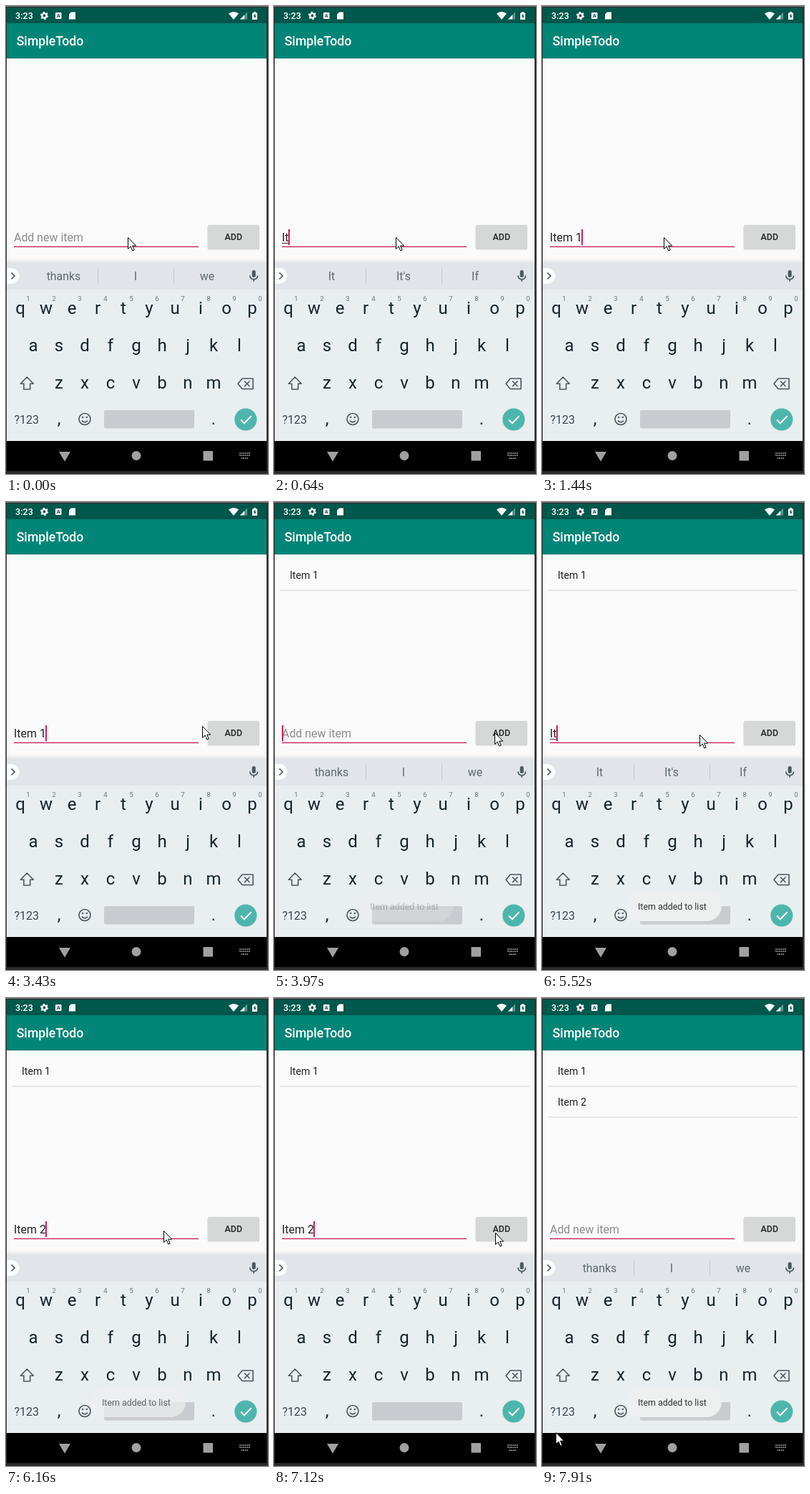
An HTML page that plays this animation: 366 px wide and 652 px high, repeating every 8000 ms.

```html
<!DOCTYPE html>
<html lang="en">
<head>
<meta charset="utf-8">
<title>Todo list</title>
<style>
html, body { margin: 0; width: 100%; height: 100%; overflow: hidden; background: #222; }
svg { display: block; width: 100%; height: 100%; font-family: Roboto, sans-serif; }
text { white-space: pre; }
.mid { text-anchor: middle; }
.medium { font-weight: 500; }
.key { font-size: 24px; fill: #13242b; }
.digit { font-size: 9.5px; fill: #6b777c; }
.word { font-size: 15.9px; fill: #5f696e; }
.entry { font-size: 15.93px; }
.row { font-size: 14.16px; fill: #222; }
.icon { fill: none; stroke: #4a575d; stroke-width: 1.6; }
</style>
</head>
<body>
<svg viewBox="0 0 366 652">
  <defs>
    <linearGradient id="shade" x2="0" y2="1">
      <stop stop-color="#000" stop-opacity="0"/><stop offset="1" stop-color="#000" stop-opacity=".07"/>
    </linearGradient>
  </defs>
  <rect width="366" height="652" fill="#2b2b2b"/>
  <rect width="366" height="1" fill="#777"/>
  <rect x="1" y="2" width="363" height="22" fill="#00574b"/>
  <rect x="1" y="24" width="363" height="49" fill="#008577"/>
  <rect x="1" y="73" width="363" height="284" fill="#fafafa"/>
  <rect x="1" y="73" width="363" height="1" fill="#dfe3e2"/>
  <rect x="1" y="351" width="363" height="6" fill="url(#shade)"/>
  <rect x="1" y="357" width="363" height="38" fill="#e1e5e9"/>
  <rect x="1" y="395" width="363" height="211" fill="#e9eef1"/>
  <rect x="1" y="606" width="363" height="42" fill="#000"/>

  <!-- status and title bars -->
  <g fill="#fff">
    <text class="medium" x="13" y="18" font-size="12.6">3:23</text>
    <circle cx="53.5" cy="13.5" r="3.1" fill="none" stroke="#fff" stroke-width="2.4"/>
    <circle cx="53.5" cy="13.5" r="4.8" fill="none" stroke="#fff" stroke-width="1.6" stroke-dasharray="2.5 2.53"/>
    <rect x="69" y="9" width="8.5" height="9" rx="1"/>
    <text class="mid" x="73.2" y="16.4" font-size="7.5" font-weight="700" fill="#00574b">A</text>
    <path d="M91 8.5h6v10h-9v-7z"/>
    <path d="M311 10.5q7-5 14 0l-7 8.5z"/>
    <path d="M337 8.5v10h-10z" opacity=".35"/><path d="M333 12.5v6h-6z"/>
    <path d="M344 9.5h2v-1.2h3v1.2h2v9.5h-7z"/>
    <path d="M348.2 10.5l-2.6 4h1.6v3l2.6-4h-1.6z" fill="#00574b"/>
    <text class="medium" x="14.7" y="55" font-size="17.7">SimpleTodo</text>
  </g>

  <!-- list and entry row -->
  <g id="list"></g>
  <text class="entry" id="entry" x="11" y="328"></text>
  <rect id="compose" x="11" y="330" height="1" fill="#333"/>
  <rect x="11" y="334.7" width="258" height="1.4" fill="#c2275b"/>
  <rect id="caret" y="311" width="2" height="22" fill="#d81b60"/>
  <rect x="281.5" y="306" width="72.5" height="33.5" rx="2" fill="#c6c6c6" opacity=".7"/>
  <rect id="button" x="282" y="305" width="71.5" height="33" rx="2"/>
  <text class="mid medium" x="317.8" y="326" font-size="12.4" fill="#222">ADD</text>

  <!-- suggestion strip -->
  <path d="M1 365h6.5a11 11 0 0 1 0 22H1z" fill="#fafbfc"/>
  <path class="icon" d="M7.5 371.5l4.5 4.5-4.5 4.5"/>
  <g id="strip">
    <path d="M128.5 366v21M234.5 366v21" stroke="#c3c9cd"/>
  </g>
  <rect x="343.7" y="368" width="5" height="10" rx="2.5" fill="#4a575d"/>
  <path class="icon" d="M340.8 375.5a5.4 5.4 0 0 0 10.8 0M346.2 381v3"/>

  <!-- keyboard -->
  <g id="keys"></g>
  <path class="icon" d="M29.3 517l9 9.3h-4.6v7.7h-8.8v-7.7h-4.6z" stroke-linejoin="round"/>
  <path class="icon" d="M330 519h15v14.5h-15l-6-7.2zM333 522.5l7.5 7.5M340.5 522.5l-7.5 7.5"/>
  <text x="11.5" y="581.5" font-size="16" fill="#37474f">?123</text>
  <text class="key mid" x="74" y="583">,</text>
  <text class="key mid" x="290" y="583">.</text>
  <circle class="icon" cx="110" cy="575.5" r="8"/>
  <path class="icon" d="M106 577.5q4 4.8 8 0"/>
  <g fill="#4a575d"><circle cx="107.2" cy="573" r="1.2"/><circle cx="112.8" cy="573" r="1.2"/></g>
  <rect x="137" y="563" width="126" height="25.5" rx="2.5" fill="#c8ccd0"/>
  <circle cx="334.8" cy="576" r="15.6" fill="#4db6ac"/>
  <path d="M328 576.5l4.8 4.8 9.7-10" fill="none" stroke="#fff" stroke-width="2"/>

  <g id="toast">
    <rect x="118" y="542" width="133" height="42" rx="21" fill="#eeefef"/>
    <text x="134" y="567.5" font-size="12.4" fill="#333">Item added to list</text>
  </g>

  <!-- navigation bar -->
  <g fill="#a0a0a0">
    <path d="M74 621h16l-8 13.5z"/>
    <circle cx="182" cy="626.5" r="6.5"/>
    <rect x="275.5" y="620" width="13.5" height="13.5"/>
    <path d="M326 623h15M326 626h15M328.5 630h10" stroke="#a0a0a0" stroke-width="1.7" stroke-dasharray="1.9 .7"/>
  </g>

  <path id="cursor" d="M.5 .5v16l3.7-3.5 2.6 6 2.4-1-2.6-5.9h5z" fill="#fff" stroke="#000"/>
</svg>
<script>
const LOOP = 8000;
const BLINK = 475;
const $ = id => document.getElementById(id);
const clamp = v => Math.min(1, Math.max(0, v));

function append(parent, tag, attributes, label = '') {
  const el = document.createElementNS('http://www.w3.org/2000/svg', tag);
  for (const name in attributes) el.setAttribute(name, attributes[name]);
  el.textContent = label;
  return parent.appendChild(el);
}

['qwertyuiop', 'asdfghjkl', 'zxcvbnm'].forEach((letters, row) =>
  [...letters].forEach((letter, i) => {
    const x = 182 + 36 * (i - (letters.length - 1) / 2);
    append($('keys'), 'text', { class: 'key mid', x, y: 429 + 52 * row }, letter);
    if (row === 0) append($('keys'), 'text', { class: 'digit mid', x: x + 11, y: 411 }, (i + 1) % 10);
  }));

const words = [80.5, 181, 281].map(x => append($('strip'), 'text', { class: 'word mid', x, y: 382 }));
const suggestions = {
  '': 'thanks I we', I: 'I It If', It: "It It's If", Ite: 'Ite Item Items', Item: 'Item Items Its'
};

// Each item is typed at an even pace, then added to the list.
const items = [
  { text: 'Item 1', from: 250, to: 1440, added: 3820 },
  { text: 'Item 2', from: 5250, to: 6160, added: 7250 }
];
items.forEach((item, i) => {
  item.row = append($('list'), 'g', { class: 'row' });
  append(item.row, 'text', { x: 22, y: 107 + 43 * i }, item.text);
  append(item.row, 'rect', { x: 8, y: 122.5 + 43 * i, width: 349, height: 1, fill: '#d5d5d5' });
});

// Pointer path as [ms, x, y]; a repeated place is a rest.
const path = [
  [3000, 170, 322], [3310, 240, 277], [3430, 274, 312], [3550, 307, 319], [3970, 309, 321],
  [4100, 220, 329], [4480, 189, 328], [4730, 220, 324], [6500, 220, 324],
  [6850, 290, 342], [7120, 309, 327], [7550, 309, 327], [7910, 19, 605]
];
function pointer(t) {
  const next = path.findIndex(([time]) => time > t);
  if (next === 0) return path[0].slice(1);
  if (next < 0) return path.at(-1).slice(1);
  const [a, b] = [path[next - 1], path[next]];
  const k = (t - a[0]) / (b[0] - a[0]);
  return [1, 2].map(i => Math.round(a[i] + (b[i] - a[i]) * k));
}

function typing(t) {
  const item = items.find(({ from, added }) => t >= from && t < added);
  if (!item) {
    const lastAdd = items.findLast(({ added }) => t >= added);
    return { typed: '', lastEdit: lastAdd ? lastAdd.added : -BLINK };
  }
  const { text, from, to } = item;
  const pace = (to - from) / (text.length - 1);
  const key = Math.min(text.length - 1, Math.floor((t - from) / pace));
  return { typed: text.slice(0, key + 1), lastEdit: from + key * pace };
}

const toastOpacity = sinceAdd => clamp((sinceAdd - 100) / 200) * clamp((2480 - sinceAdd) / 200);

function draw(t) {
  const { typed, lastEdit } = typing(t);
  const entry = $('entry');
  entry.textContent = typed || 'Add new item';
  entry.setAttribute('fill', typed ? '#222' : '#8c8c8c');

  const width = typed ? entry.getComputedTextLength() : 0;
  $('caret').setAttribute('x', Math.max(11, Math.round(10.3 + width)));
  $('caret').setAttribute('opacity', Math.floor((t - lastEdit) / BLINK) % 2 ? 0 : 1);
  $('compose').setAttribute('width', typed.includes(' ') ? 0 : width);

  const offered = suggestions[typed.trim()];
  $('strip').setAttribute('opacity', offered ? 1 : 0);
  if (offered) offered.split(' ').forEach((word, i) => words[i].textContent = word);

  for (const { row, added } of items) row.setAttribute('opacity', t >= added ? 1 : 0);
  const pressed = items.some(({ added }) => t > added - 120 && t < added + 150);
  $('button').setAttribute('fill', pressed ? '#cacbcb' : '#d6d7d7');
  $('toast').setAttribute('opacity', Math.max(...items.map(({ added }) => toastOpacity(t - added))));
  $('cursor').setAttribute('transform', `translate(${pointer(t)})`);
}

const start = performance.now();
function tick() {
  draw((performance.now() - start) % LOOP);
  requestAnimationFrame(tick);
}
tick();
</script>
</body>
</html>
```
